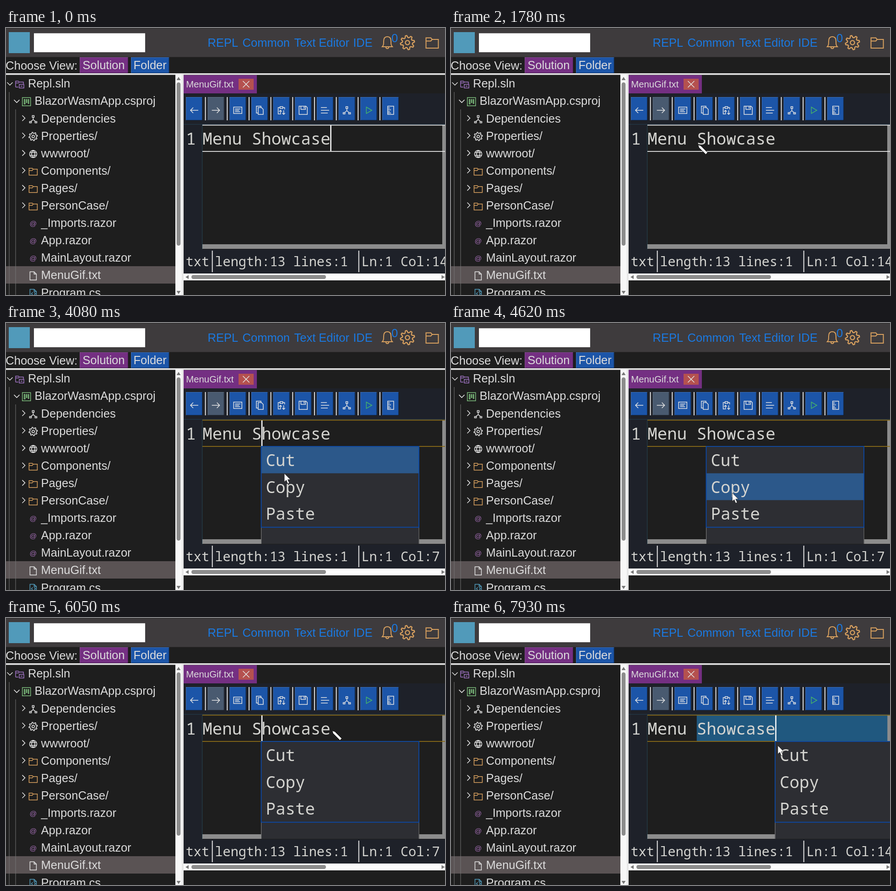
These frames come from a looping animation (959x584 px, 8000 ms). An HTML page:

```html
<!DOCTYPE html>
<html lang="en">
<head>
<meta charset="utf-8">
<title>Editor context menu</title>
<style>
html, body { margin: 0; width: 100%; height: 100%; overflow: hidden; background: #1e1e1e; }
svg { display: block; width: 100%; height: 100%; }
text { font: 25.5px "Liberation Sans", Arial, sans-serif; fill: #dcdcdc; white-space: pre; }
text.code { font: 35.83px "Noto Sans Mono", Consolas, monospace; fill: #d4d4d0; }
text.status { font: 28.5px "Noto Sans Mono", Consolas, monospace; fill: #d4d4d0; }
text.tab { font-size: 20.4px; }
text.at { font-size: 15.5px; fill: #a66fb8; }
text.link { fill: #1b79e0; }
.ico { fill: none; stroke-width: 1.5; }
</style>
</head>
<body>
<svg id="stage" viewBox="0 0 959 584" preserveAspectRatio="none"></svg>
<script>
const LOOP = 8000;
const WHITE = '#e4e4e4', ORANGE = '#d9a15f', PURPLE = '#742f82', BLUE = '#1c55a8';
const GOLD = '#8c6c17', PANEL = '#1e2129', BAR = '#8c8c8c';
const CHAR = 21.5, TEXT_X = 429.3, ROW = 58.7, MENU_X = 557, MENU_Y = 270;

const rect = (x, y, w, h, fill, more = '') =>
  `<rect x="${x}" y="${y}" width="${w}" height="${h}" fill="${fill}" ${more}/>`;
const text = (x, y, str, cls = '', more = '') =>
  `<text x="${x}" y="${y}" class="${cls}" ${more}>${str}</text>`;
const icon = (x, y, d, color = WHITE, more = '') =>
  `<path class="ico" transform="translate(${x} ${y})" d="${d}" stroke="${color}" ${more}/>`;
const solid = (d, fill) => `<path d="${d}" fill="${fill}"/>`;

// a button face with a thin raised edge
const button = (x, y, w, h, fill) => rect(x, y, w, h, fill) +
  rect(x + w - 1, y, 1, h, '#000', 'opacity=".45"') + rect(x, y + h - 1, w, 1, '#000', 'opacity=".45"') +
  rect(x, y, 1, h, '#fff', 'opacity=".14"') + rect(x, y, w, 1, '#fff', 'opacity=".14"');

function gear(cx, cy, r, color, width) {
  const pts = [];
  for (let i = 0; i < 32; i++) {
    const a = (i - 1.5) * Math.PI / 16, k = i % 4 < 2 ? r * 0.72 : r;
    pts.push(`${(k * Math.sin(a)).toFixed(2)} ${(k * Math.cos(a)).toFixed(2)}`);
  }
  const q = r * 0.3;
  const hole = `M${-q} 0a${q} ${q} 0 1 0 ${2 * q} 0a${q} ${q} 0 1 0 ${-2 * q} 0`;
  return icon(cx, cy, `M${pts.join('L')}Z${hole}`, color, `style="stroke-width:${width}"`);
}

const shapes = {
  right: 'M-3 -6L3 0L-3 6',
  down: 'M-6 -3L0 3L6 -3',
  folder: 'M-9 8V-7H-2L0 -5H9V8ZM-9 -2H-2L0 -5',
  file: 'M-7 -9H2L7 -4V9H-7ZM2 -9V-4H7',
  globe: 'M-8 0a8 8 0 1 0 16 0a8 8 0 1 0 -16 0M-8 -3H8M-8 3H8M0 -8C-5 -3 -5 3 0 8M0 -8C5 -3 5 3 0 8',
  deps: 'M-2 -8H2V-4H-2ZM0 -4V1M0 1L-5 5M0 1L5 5M-8 5H-4V8H-8ZM4 5H8V8H4Z',
  project: 'M-9 -9H9V9H-9ZM-5 -5V5H-3V-5ZM0 -5V2H1V-5ZM4 -5V4H5V-5Z',
  solution: 'M-9 6V-7H-3L-1 -5H8V-1M-9 -3H-3L-1 -5M-9 6H-3M-1 0H9V8H-1ZM2 4H6'
};

function header() {
  return rect(0, 0, 959, 63.5, '#3e3b3d') + rect(0, 0, 959, 1, '#2c2a2b') +
    rect(6, 9, 46, 46, '#519aba') + rect(61, 11.5, 243, 41.5, '#fff') +
    [['REPL', 440.6], ['Common', 516.6], ['Text Editor', 629.5], ['IDE', 758.2]]
      .map(([s, x]) => text(x, 41, s, 'link')).join('') +
    icon(833, 32, 'M-11 9C-8 6 -8 3 -8 -3C-8 -10 -5 -13 0 -13C5 -13 8 -10 8 -3C8 3 8 6 11 9ZM-3 10C-3 14 3 14 3 10',
      ORANGE, 'style="stroke-width:2"') +
    text(842, 31, '0', 'link') + gear(877, 32, 15.5, ORANGE, 2.3) +
    icon(931, 33, 'M-13.5 11V-11.5H-3L0 -8H13.5V11ZM-13.5 -4.5H-3L0 -8', ORANGE, 'style="stroke-width:2"') +
    text(-0.7, 91, 'Choose View:') +
    button(161, 64, 106, 35, PURPLE) + text(167.3, 90, 'Solution') +
    button(273, 64, 83.5, 35, BLUE) + text(278.5, 90, 'Folder') +
    rect(0, 99, 959, 3.5, '#e6e6e6');
}

function tree() {
  const rows = [
    ['Repl.sln', 'solution', '#a074c4'], ['BlazorWasmApp.csproj', 'project', '#7dbd7d'],
    ['Dependencies', 'deps'], ['Properties/', 'gear'], ['wwwroot/', 'globe'],
    ['Components/', 'folder', ORANGE], ['Pages/', 'folder', ORANGE], ['PersonCase/', 'folder', ORANGE],
    ['_Imports.razor', 'at'], ['App.razor', 'at'], ['MainLayout.razor', 'at'],
    ['MenuGif.txt', 'file'], ['Program.cs', 'file', '#519aba']
  ];
  let out = rect(0, 521, 370, 38, '#5a5354') +
    rect(6.5, 140, 1, 444, '#777') + rect(20.5, 178, 1, 406, '#777');
  rows.forEach(([name, kind, color], i) => {
    const y = 122 + 38.1 * i, level = Math.min(i, 2);
    const ix = 30 + 14.7 * level;
    if (i < 8) out += icon(8.5 + 15 * level, y - (i < 2 ? 0 : 1), i < 2 ? shapes.down : shapes.right);
    if (kind === 'at') out += text(ix - 8, y + 6, '@', 'at');
    else if (kind === 'gear') out += gear(ix, y + 1, 9.3, WHITE, 1.6);
    else out += icon(ix, y + 1.2, shapes[kind], color);
    if (i === 12) out += icon(ix, y + 2, 'M-1 -3L-4 0L-1 3M2 -3L5 0L2 3', color);
    out += text([48, 62.5, 76.6][level], y + 8.3, name);
  });
  return out + rect(370, 102, 18, 482, '#f7f7f7') + rect(384, 102, 4, 482, '#e6e6e6') +
    rect(372.7, 119, 8.6, 357, BAR, 'rx="4.3"') +
    solid('M372.5 114L377 107L381.5 114Z', '#777') + solid('M372.5 575L377 582L381.5 575Z', '#777');
}

function toolbar() {
  const icons = [
    'M9 0H-8M-2 -6L-8 0L-2 6', 'M-9 0H8M2 -6L8 0L2 6',
    'M-9 -7H9V7H-9ZM-6 -3H6M-6 0H3M-6 3H5',
    'M-3 -6H4L8 -2V9H-3ZM-3 6H-7V-9H3V-6',
    'M-3 8H-7V-6H-3M3 -6H7V-2M-3 -8H3V-4H-3ZM-2 9V0M-5 3L-2 0L1 3M5 0V9M2 6L5 9L8 6',
    'M-9 -9H6L9 -6V9H-9ZM-5 -9V-2H5V-9M2 -8V-4',
    'M-9 -6H4M-9 0H9M-9 6H6', shapes.deps, 'M-5 -7L7 0L-5 7Z',
    'M-6 -9H7V9H-6ZM-6 -5H-1M-6 -1H1M-6 3H-1M-6 6H1'
  ];
  return icons.map((d, i) => {
    const x = 393 + 47.65 * i;
    return (i ? rect(x - 6, 151, 2, 51, WHITE) : '') +
      button(x, 151, 36, 51, i === 1 ? '#495a70' : BLUE) +
      icon(x + 18, 180, d, i === 8 ? '#45b06c' : WHITE);
  }).join('');
}

function editor() {
  return rect(388, 103, 160, 40, PURPLE) + text(393.2, 130, 'MenuGif.txt', 'tab') +
    rect(508, 111, 33, 24, '#b5514f') + icon(524.5, 123, 'M-7 -7L7 7M7 -7L-7 7') +
    rect(388, 143, 571, 394, PANEL) + toolbar() +
    rect(388, 210, 571, 1.2, '#233a4a') + rect(429, 212, 530, 272, '#1e1e1e') +
    rect(428, 212, 1.3, 272, '#263d49') +
    rect(429, 473, 530, 10, BAR) + rect(953, 213, 6, 260, BAR) +
    rect(TEXT_X + 5 * CHAR, 213, 416.5, 56, '#20587f', 'id="sel"') +
    rect(429, 211.6, 530, 1.8, WHITE, 'class="edge"') +
    rect(429, 269, 530, 1.8, WHITE, 'class="edge"') +
    text(393.3, 255, '1', 'code') + text(TEXT_X, 255, 'Menu Showcase', 'code') +
    rect(0, 213, 2.5, 56, '#fff', 'id="caret"') +
    text(392.7, 521, 'txt', 'status') + rect(449.7, 487, 2, 47, WHITE) +
    text(456.5, 521, 'length:13 lines:1', 'status') + rect(769.7, 487, 2, 47, WHITE) +
    text(776.5, 521, '', 'status', 'id="pos"') +
    rect(388, 537, 571, 15, '#fbfbfb') + rect(405, 540.3, 294, 8.6, BAR, 'rx="4.3"') +
    solid('M399 540.5L392 544.7L399 549Z', '#777') + solid('M951.5 540.5L958.5 544.7L951.5 549Z', '#777');
}

function menu() {
  const w = 345.5, h = 3 * ROW + 0.6;
  return '<g id="menu">' + rect(MENU_X, MENU_Y, w, 213, '#2d2e33') +
    rect(MENU_X, MENU_Y + h, 1.2, 213 - h, '#777') + rect(MENU_X + w - 1, MENU_Y + h, 1, 213 - h, '#777') +
    rect(MENU_X, MENU_Y, w, ROW, '#2c588a', 'id="hover"') +
    rect(MENU_X + 0.5, MENU_Y, w - 1, h, 'none', 'stroke="#0b49a8" stroke-width="1.8"') +
    ['Cut', 'Copy', 'Paste'].map((s, i) => text(567.4, 313.4 + 58.5 * i, s, 'code')).join('') + '</g>';
}

const pointer = '<g id="pointer">' +
  '<path id="pen" d="M-.5 -.5L5.5 1.5L20.5 16.5L16.5 20.5L1.5 5.5Z" fill="#fff" stroke="#111" stroke-width="1"/>' +
  '<path id="arrow" d="M0 0V18.5L4.3 14.6L7.5 22.5L10.8 21L7.5 13.5H13.3Z" fill="#fff" stroke="#222" stroke-width=".8"/></g>';

const $ = id => document.getElementById(id);
$('stage').innerHTML = header() + tree() + editor() + menu() + pointer;
const edges = [...document.querySelectorAll('.edge')];

// time, x, y of the pointer tip
const path = [
  [0, 930, 620], [255, 930, 620], [260, 908, 574], [560, 812, 478], [1040, 659, 340], [1110, 640, 323],
  [1640, 537, 263], [1780, 540, 256], [1850, 544, 250], [2000, 551, 245], [2790, 551, 245],
  [3200, 578, 271], [3600, 598, 304], [4080, 608, 329], [4420, 614, 364], [5000, 615, 386],
  [5210, 616, 390], [5300, 616, 390], [6050, 713, 247], [6310, 713, 247], [7040, 618, 228],
  [7520, 618, 228], [7590, 628, 237], [7725, 628, 237], [7930, 714, 279], [8000, 714, 279]
];
const blinks = [460, 970, 1470, 1960, 2830, 3050, 3550, 4050, 4550, 5050, 5550, 6050, 6550, 6970];

function tipAt(t) {
  const i = path.findIndex(p => p[0] > t);
  const [t0, x0, y0] = path[i - 1], [t1, x1, y1] = path[i];
  const k = (t - t0) / (t1 - t0);
  return [x0 + (x1 - x0) * k, y0 + (y1 - y0) * k];
}

const show = (id, on) => $(id).setAttribute('visibility', on ? 'visible' : 'hidden');

function draw(t) {
  const [x, y] = tipAt(t);
  const first = t >= 2380 && t < 6970, second = t >= 7590;
  const row = Math.floor((y - 271.5) / ROW);
  const inMenu = (first || second) && row >= 0 && row < 3;
  const col = t < 2260 ? 13 : t < 6970 ? 6 : t < 7120 ? 9 : 13;

  $('pointer').setAttribute('transform', `translate(${x} ${y})`);
  const arrow = inMenu || y > 473;
  show('arrow', arrow);
  show('pen', !arrow);

  show('menu', first || second);
  $('menu').setAttribute('transform', `translate(${second ? 7 * CHAR : 0} 0)`);
  show('hover', first && inMenu);
  $('hover').setAttribute('y', MENU_Y + Math.max(0, Math.min(2, row)) * ROW);

  show('sel', t >= 7120);
  edges.forEach(e => e.setAttribute('fill', t < 2380 ? WHITE : GOLD));
  show('caret', blinks.filter(b => b <= t).length % 2 === 0);
  $('caret').setAttribute('x', TEXT_X + col * CHAR - 0.5);
  $('pos').textContent = `Ln:1 Col:${col + 1}`;
}

const start = performance.now();
function tick() {
  draw((performance.now() - start) % LOOP);
  requestAnimationFrame(tick);
}
tick();
</script>
</body>
</html>
```
